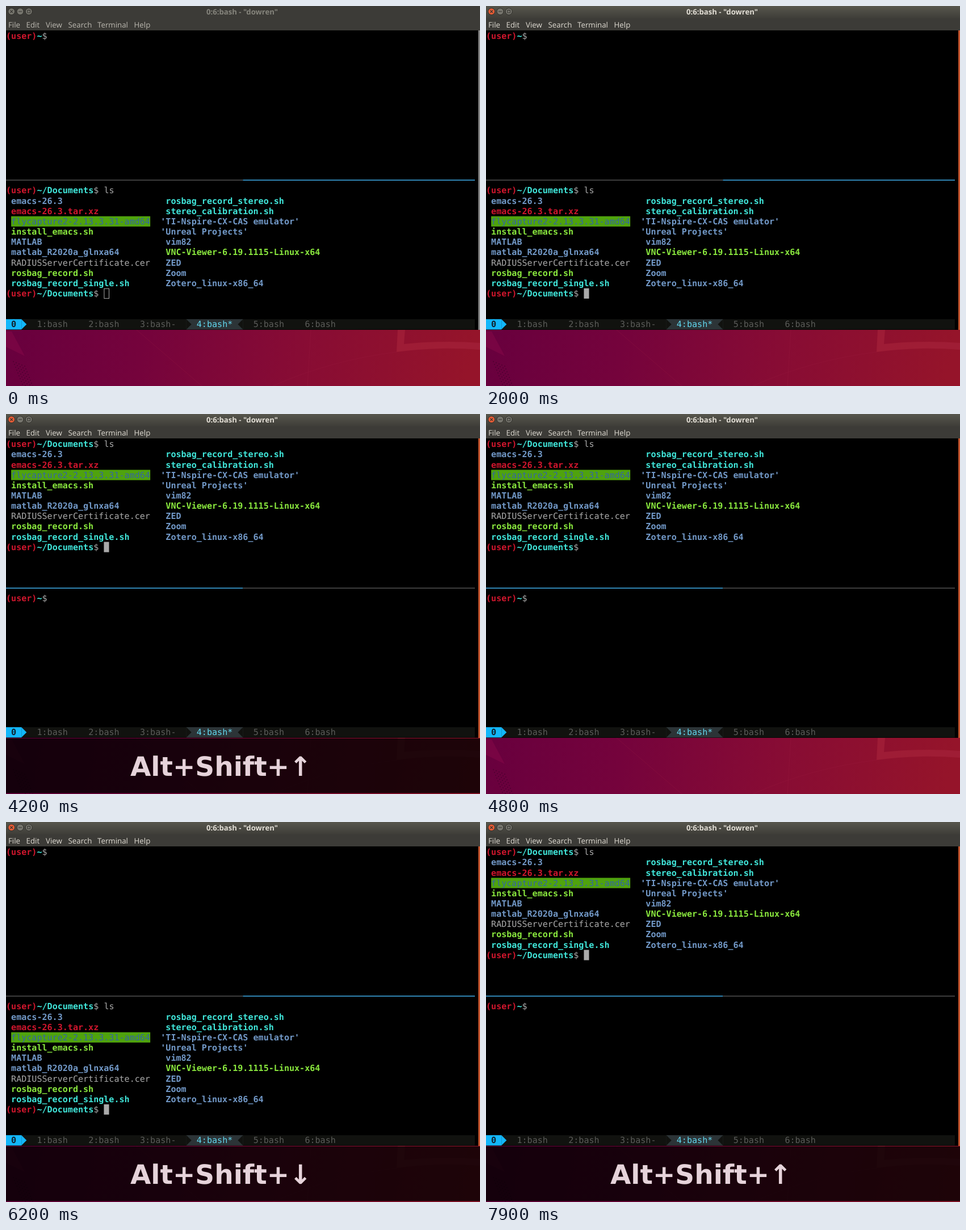
Write an HTML page that moves like this. It is 835 by 670 pixels and loops after 8000 ms.

```html
<!DOCTYPE html>
<html lang="en">
<head>
<meta charset="utf-8">
<title>Terminal panes</title>
<style>
  html, body { margin: 0; width: 100%; height: 100%; overflow: hidden; background: #000; }
  svg { display: block; }
  text { white-space: pre; text-rendering: geometricPrecision; }
  #terminal text { font: 15.075px "DejaVu Sans Mono", monospace; }
  #terminal .bold { font-weight: bold; }
  .ui { font: 13.3px "Open Sans", sans-serif; }
  .title { font: bold 13.15px "Open Sans", sans-serif; }
  .keys { font: bold 47px "DejaVu Sans", sans-serif; }
</style>
</head>
<body>
<svg width="835" height="670" viewBox="0 0 835 670">
  <defs>
    <linearGradient id="sky" gradientUnits="userSpaceOnUse" x1="0" y1="560" x2="800" y2="720">
      <stop offset="0" stop-color="#68003e"/>
      <stop offset=".3" stop-color="#75033c"/>
      <stop offset=".6" stop-color="#860b35"/>
      <stop offset="1" stop-color="#95142a"/>
    </linearGradient>
    <linearGradient id="bar" x2="0" y2="1">
      <stop offset="0" stop-color="#57564d"/>
      <stop offset="1" stop-color="#3e3d38"/>
    </linearGradient>
  </defs>

  <g id="wallpaper">
    <rect y="571" width="835" height="99" fill="url(#sky)"/>
    <path d="M0 574H10L33 617L0 601Z" fill="#8a0a4a" opacity=".45"/>
    <path d="M690 571H703L701 596Q770 589 835 594V606Q760 600 688 610Z" fill="#a32038" opacity=".75"/>
    <path d="M537 571L531 670M470 670Q570 625 688 610M230 571L345 670" fill="none" stroke="#a02045" opacity=".25"/>
  </g>

  <g id="terminal">
    <rect y="43" width="832" height="528" fill="#000"/>
    <rect id="edge" x="832" y="43" width="3" height="528"/>
    <rect id="dividerLeft" y="306.2" width="417.4" height="1.6"/>
    <rect id="dividerRight" x="417.4" y="306.2" width="408.6" height="1.6"/>
    <g id="listing"></g>
    <g id="shell"></g>
    <g id="status"></g>
  </g>

  <g id="window">
    <rect width="835" height="43" fill="#3c3b37"/>
    <rect id="titleBar" width="835" height="22" fill="url(#bar)"/>
    <g stroke="#2f2e2a" stroke-width="1">
      <circle id="close" cx="9.7" cy="9.7" r="5.9"/>
      <circle cx="25" cy="9.7" r="5.9" fill="#77766e"/>
      <circle cx="40.2" cy="9.7" r="5.9" fill="#77766e"/>
      <path d="M7.4 7.4l4.6 4.6m0-4.6l-4.6 4.6M22 9.7h6M37.9 7.4h4.6v4.6h-4.6z" fill="none" stroke="#34332f" stroke-width="1.1"/>
    </g>
    <text id="title" class="title" x="416" y="14.6" text-anchor="middle">0:6:bash - "dowren"</text>
    <g id="menu" class="ui"></g>
    <path id="mnemonics" d="M4 38.5h7M36 38.5h7M70 38.5h8M110 38.5h7M161 38.5h7M226 38.5h9" stroke="#dfdbd2"/>
  </g>

  <g id="overlay">
    <rect y="572" width="835" height="96.5" fill="#000" opacity=".8"/>
    <text id="keys" class="keys" x="219" y="638" fill="#e6d3da"></text>
  </g>
</svg>

<script>
const CELL_W = 9.076, CELL_H = 18.15, TOP = 44;
const LOWER_PANE = 15 * CELL_H;
const GREY = '#aaaaaa', RED = '#d0162d', CYAN = '#40e6da',
      BLUE = '#7299c8', GREEN = '#8ae83e', ACCENT = '#3ba4dd';

const $ = id => document.getElementById(id);

function add(parent, tag, attributes, content = '') {
  const node = document.createElementNS('http://www.w3.org/2000/svg', tag);
  for (const key in attributes) node.setAttribute(key, attributes[key]);
  node.textContent = content;
  return $(parent).appendChild(node);
}

function write(parent, col, row, string, fill, bold = true) {
  return add(parent, 'text', {
    x: col * CELL_W, y: TOP + row * CELL_H + 14.2, fill, class: bold ? 'bold' : ''
  }, string);
}

function cells(parent, col, row, count, fill) {
  return add(parent, 'rect', {
    x: col * CELL_W, y: TOP + row * CELL_H, width: count * CELL_W, height: CELL_H, fill
  });
}

function prompt(parent, row, path) {
  write(parent, 0, row, '(user)', RED);
  write(parent, 6, row, path, CYAN);
  write(parent, 6 + path.length, row, '$', GREY, false);
}

// Directory listing pane
const leftFiles = [
  ['emacs-26.3', BLUE], ['emacs-26.3.tar.xz', RED],
  ['flycapture2-2.13.3.31-amd64', '#3465a4', false],
  ['install_emacs.sh', GREEN], ['MATLAB', BLUE], ['matlab_R2020a_glnxa64', BLUE],
  ['RADIUSServerCertificate.cer', GREY, false],
  ['rosbag_record.sh', GREEN], ['rosbag_record_single.sh', CYAN]
];
const rightFiles = [
  ['rosbag_record_stereo.sh', CYAN], ['stereo_calibration.sh', CYAN],
  ["'TI-Nspire-CX-CAS emulator'", BLUE], ["'Unreal Projects'", BLUE], ['vim82', BLUE],
  ['VNC-Viewer-6.19.1115-Linux-x64', GREEN],
  ['ZED', BLUE], ['Zoom', BLUE], ['Zotero_linux-x86_64', BLUE]
];
prompt('listing', 0, '~/Documents');
write('listing', 19, 0, 'ls', GREY, false);
cells('listing', 1, 3, 27, '#4fa30d');
leftFiles.forEach((file, i) => write('listing', 1, i + 1, ...file));
rightFiles.forEach((file, i) => write('listing', file[0][0] === "'" ? 30 : 31, i + 1, ...file));
prompt('listing', 10, '~/Documents');
const cursor = cells('listing', 19, 10, 1, GREY);
const hollowCursor = add('listing', 'rect', {
  x: 172.9, y: 226, width: 8.6, height: 17.4, fill: 'none', stroke: GREY
});

prompt('shell', 0, '~');

// Status line
const statusY = TOP + 28 * CELL_H;
const arrow = (col, direction, fill) => {
  const base = (direction > 0 ? col : col + 1) * CELL_W;
  add('status', 'path', {
    d: `M${base} ${statusY}l${direction * CELL_W} ${CELL_H / 2}l${-direction * CELL_W} ${CELL_H / 2}z`, fill
  });
};
cells('status', 0, 28, 91, '#11120f');
cells('status', 0, 28, 3, '#12b7fb');
arrow(3, 1, '#12b7fb');
cells('status', 35, 28, 11, '#2c3437');
arrow(35, 1, '#11120f');
arrow(45, -1, '#11120f');
write('status', 1, 28, '0', '#10202a');
[[6, '1:bash'], [16, '2:bash'], [26, '3:bash-'], [37, '4:bash*'], [48, '5:bash'], [58, '6:bash']]
  .forEach(([col, name]) => write('status', col, 28, name, name.endsWith('*') ? '#62d8f0' : '#5b5c59', false));

[[4, 'File'], [35.5, 'Edit'], [70, 'View'], [109.5, 'Search'], [161, 'Terminal'], [225.5, 'Help']]
  .forEach(([x, name]) => add('menu', 'text', { x, y: 37.6 }, name));

// Dotted patch in the corner of the wallpaper
for (let i = 0; i < 9; i++)
  for (let j = 0; j < 5; j++)
    add('wallpaper', 'circle', {
      cx: 13 + j * 5 + i * 2, cy: 627 + i * 5 + j * 2, r: 0.9, fill: '#42002c', opacity: 0.7
    });

const within = (t, ...spans) => spans.some(([from, to]) => t >= from && t < to);
const show = (node, visible) => node.setAttribute('visibility', visible ? 'visible' : 'hidden');
const paint = (id, fill) => $(id).setAttribute('fill', fill);

function render(t) {
  const focused = t >= 900;
  const listingOnTop = within(t, [3200, 5200], [7500, 8000]);
  const cursorOff = within(t, [1400, 2000], [3600, 4200], [4800, 5200], [5600, 6200], [6800, 7000]);

  $('listing').setAttribute('transform', `translate(0 ${listingOnTop ? 0 : LOWER_PANE})`);
  $('shell').setAttribute('transform', `translate(0 ${listingOnTop ? LOWER_PANE : 0})`);
  paint('dividerLeft', listingOnTop ? ACCENT : '#4c4c4c');
  paint('dividerRight', listingOnTop ? '#4c4c4c' : ACCENT);
  show(cursor, focused && !cursorOff);
  show(hollowCursor, !focused);

  paint('edge', focused ? '#c4532c' : '#858585');
  paint('close', focused ? '#e65c35' : '#77766e');
  paint('title', focused ? '#e2ded5' : '#85847c');
  paint('menu', focused ? '#dfdbd2' : '#bbb8b0');
  show($('titleBar'), focused);
  show($('mnemonics'), within(t, [7200, 7900]));

  show($('overlay'), within(t, [3200, 4800], [5200, 6700], [7500, 8000]));
  $('keys').textContent = 'Alt+Shift+' + (listingOnTop ? '↑' : '↓');
}

const start = performance.now();
function tick() {
  render((performance.now() - start) % 8000);
  requestAnimationFrame(tick);
}
tick();
</script>
</body>
</html>
```
